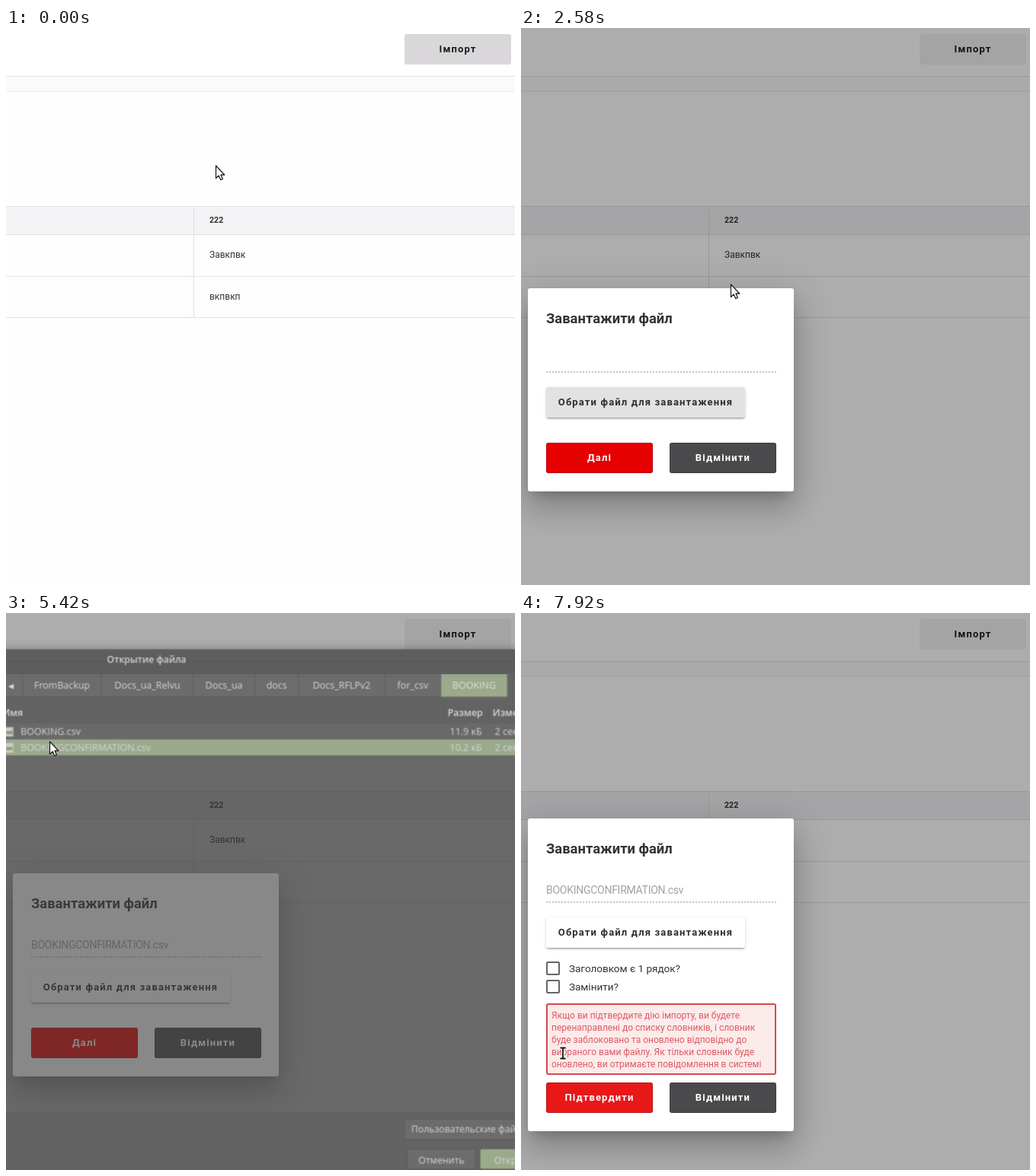
An HTML page for the animation above (8 s loop, 668x732 px).

```html
<!DOCTYPE html>
<html lang="uk">
<head>
<meta charset="utf-8">
<title>Імпорт</title>
<style>
html, body { margin: 0; width: 100%; height: 100%; overflow: hidden; }
body { position: relative; background: #fefefe; color: #333; font: 12px/20px Roboto, sans-serif; }
body * { box-sizing: border-box; }
div, span, svg { position: absolute; white-space: nowrap; }

/* 1% of the loop is 80 ms */
.smooth, .step { animation: 8s linear infinite; }
.step { animation-timing-function: step-end; }

/* page */
.top { left: 0; top: 0; width: 668px; height: 64px; background: #fff; border-bottom: 1px solid #e2e2e2; }
.strip { left: 0; top: 64px; width: 668px; height: 20px; background: #fafafa; border-bottom: 1px solid #ececec; }
.head { left: 0; top: 234px; width: 668px; height: 38px; background: #f3f3f5; border: solid #e1e1e2; border-width: 1px 0; }
.row { left: 0; width: 668px; height: 55px; border-bottom: 1px solid #e1e1e2; }
.col { left: 246px; top: 237px; width: 1px; height: 144px; background: #dfdfe1; }

/* buttons */
.btn {
  height: 40px; border-radius: 3px; overflow: hidden; color: #fff;
  font-size: 13px; font-weight: 700; line-height: 40px; letter-spacing: 1.15px; text-align: center;
}
.btn span { left: 0; width: 100%; }
.ripple { width: 68px; height: 68px; border-radius: 50%; opacity: 0; background: rgba(0, 0, 0, .11); }
#import { left: 523px; top: 8px; width: 140px; color: #1c1c1c; background: #d9d7da; animation-name: import; }
#import .ripple { left: 26px; top: -6px; animation-name: importRipple; }
@keyframes import {
  0% { background: #d9d7da; box-shadow: none; }
  19.7% { background: #d9d7da; box-shadow: 0 1px 3px rgba(0, 0, 0, .4); }
  28.1%, 100% { background: #f2f2f2; box-shadow: none; }
}
@keyframes importRipple {
  0% { opacity: 0; transform: scale(1); }
  23.9% { opacity: 1; transform: scale(1); }
  25% { opacity: 1; transform: scale(2); }
  26% { opacity: 1; transform: scale(3); }
  27.1% { opacity: .5; transform: scale(3.6); }
  28.1%, 100% { opacity: 0; transform: scale(3.6); }
}

/* import window */
#shade { inset: 0; background: rgba(0, 0, 0, .32); animation-name: shade; }
@keyframes shade { 0%, 26% { opacity: 0; } 30.2%, 100% { opacity: 1; } }
#pop { inset: 0; transform-origin: 184px 475px; animation-name: pop; }
@keyframes pop {
  0%, 26% { opacity: 0; transform: scale(.7); }
  28.1%, 100% { opacity: 1; transform: none; }
}
#modal {
  left: 9px; top: 342px; width: 349px; height: 267px; background: #fff; border-radius: 3px;
  box-shadow: 0 11px 15px -7px rgba(0, 0, 0, .2), 0 24px 38px 3px rgba(0, 0, 0, .14), 0 9px 46px 8px rgba(0, 0, 0, .12);
  animation-name: grow;
}
@keyframes grow {
  0% { top: 342px; height: 267px; }
  95.8%, 100% { top: 270px; height: 411px; }
}
.title { left: 24px; top: 30px; font-size: 18.4px; font-weight: 700; }
#name { left: 24px; top: 84px; font-size: 14px; letter-spacing: -.27px; color: #a2a2a2; animation-name: name; }
@keyframes name { 0% { opacity: 0; } 67.6%, 100% { opacity: 1; } }
.dots { left: 24px; top: 109px; width: 302px; border-top: 2px dotted #c4c4c4; }
#pick {
  left: 24px; top: 130px; width: 261px; color: #2f2f2f; background: #e2e2e2;
  box-shadow: 0 3px 1px -2px rgba(0, 0, 0, .2), 0 2px 2px rgba(0, 0, 0, .14), 0 1px 5px rgba(0, 0, 0, .12);
  animation-name: pick;
}
@keyframes pick {
  0% { background: #e2e2e2; }
  46.8% { background: #fff; }
  70% { background: #e2e2e2; }
  95.8%, 100% { background: #fff; }
}
#pick .ripple { left: 165px; top: -14px; animation-name: pickRipple; }
@keyframes pickRipple {
  0%, 41.6% { opacity: 0; transform: scale(0); }
  41.7% { opacity: 1; transform: scale(.5); }
  44.7% { opacity: 1; transform: scale(5); }
  46.8%, 100% { opacity: 0; transform: scale(6); }
}
#next, .cancel { bottom: 24px; width: 140px; box-shadow: inset 0 0 0 1px rgba(0, 0, 0, .18); }
#next { left: 24px; background: #e60000; animation-name: next; }
@keyframes next { 0% { background: #e60000; } 95.8%, 100% { background: #e81819; } }
#next .ripple { left: -16px; top: -4px; background: rgba(255, 255, 255, .2); animation-name: nextRipple; }
@keyframes nextRipple {
  0% { opacity: 0; transform: scale(1); }
  93.7% { opacity: 1; transform: scale(1); }
  94.7% { opacity: 1; transform: scale(2.2); }
  95.8%, 100% { opacity: 0; transform: scale(3); }
}
.cancel { left: 186px; background: #4a4a4c; }
.before { animation-name: before; }
.after { animation-name: after; }
@keyframes before { 0% { opacity: 1; } 95.8%, 100% { opacity: 0; } }
@keyframes after { 0% { opacity: 0; } 95.8%, 100% { opacity: 1; } }
.box { left: 24px; width: 18px; height: 18px; border: 2px solid #666; border-radius: 2px; }
.label { left: 54px; font-size: 13.5px; }
.warn {
  left: 24px; top: 243px; width: 302px; height: 94px; padding: 6px 5px; overflow: hidden;
  border: 2px solid #d6494f; border-radius: 3px; background: #fcebeb;
  color: #da5a64; font-size: 12px; line-height: 16px;
}

/* file chooser */
#files {
  inset: 0; transform-origin: 184.5px 392px; color: #f0f0f0;
  font: 13.1px/20px "Open Sans", "Noto Sans", sans-serif; animation-name: files;
}
@keyframes files {
  0%, 45.7% { opacity: 0; transform: scale(.876); }
  47.9% { opacity: 1; transform: none; animation-timing-function: step-end; }
  67.6% { opacity: .62; transform: scale(.953); animation-timing-function: step-end; }
  68.7% { opacity: .24; transform: scale(.91); animation-timing-function: step-end; }
  69.7%, 100% { opacity: 0; transform: scale(.876); }
}
.win { left: -416px; top: 31px; width: 1201px; height: 723px; background: #363636; border-radius: 5px 5px 0 0; box-shadow: 0 2px 16px rgba(0, 0, 0, .6); }
.bar { left: -416px; width: 1201px; }
.caption { top: 34px; left: 0; width: 369px; text-align: center; font-size: 12.8px; font-weight: 600; }
.tabs { left: 14px; top: 64px; display: flex; }
.tabs span { position: static; height: 33px; border: solid #2b2b2b; border-width: 1px 1px 1px 0; background: #444; line-height: 30px; text-align: center; }
.tabs span:last-child { background: #8fa876; color: #fff; }
.th { top: 108px; font-weight: 600; }
.sep { top: 105px; width: 1px; height: 28px; background: #2e2e2e; }
#sel { top: 133px; height: 22px; background: #8fa876; animation-name: sel; }
@keyframes sel { 0% { transform: none; } 59.4%, 100% { transform: translateY(22px); } }
.icon { left: -10px; width: 11px; height: 13px; border: 1px solid #eee; background: linear-gradient(#ddd 4px, #6d9a4d 4px 9px, #ddd 9px); }
.ctl { height: 29px; border: 1px solid #2a2a2a; border-radius: 3px; background: #444; line-height: 27px; text-align: center; }
#open { left: 643px; top: 719px; width: 95px; animation-name: open; }
@keyframes open { 0% { background: #444; } 59.4%, 100% { background: #8fa876; } }

/* pointer */
#pointer { left: 0; top: 0; animation-name: move; }
#pointer svg { left: -10px; top: -10px; }
@keyframes move {
  0% { transform: translate(275px, 181px); }
  18.7% { transform: translate(275px, 181px); animation-timing-function: steps(4, start); }
  22.8% { transform: translate(583px, 35px); }
  29% { transform: translate(583px, 35px); animation-timing-function: steps(4, start); }
  33.2% { transform: translate(275px, 337px); animation-timing-function: steps(3, start); }
  36.3% { transform: translate(232px, 490px); }
  48% { transform: translate(232px, 490px); animation-timing-function: steps(5, start); }
  53.2% { transform: translate(69px, 202px); }
  57% { transform: translate(69px, 202px); animation-timing-function: steps(2, start); }
  59.1% { transform: translate(57px, 169px); }
  69.7% { transform: translate(57px, 169px); animation-timing-function: steps(5, start); }
  74.9%, 100% { transform: translate(51px, 575px); }
}
#arrow { animation-name: arrow; }
#hand { animation-name: hand; }
@keyframes arrow {
  0% { opacity: 1; } 35.3% { opacity: 0; } 46.8% { opacity: 1; } 73.8%, 100% { opacity: 0; }
}
@keyframes hand {
  0% { opacity: 0; } 35.3% { opacity: 1; } 46.8% { opacity: 0; } 73.8% { opacity: 1; } 95.8%, 100% { opacity: 0; }
}
</style>
</head>
<body>
<div class="top"></div>
<div class="strip"></div>
<div id="import" class="btn step"><div class="ripple step"></div><span>Імпорт</span></div>
<div class="head"></div>
<div class="row" style="top:272px"></div>
<div class="row" style="top:326px"></div>
<div class="col"></div>
<span style="left:267px;top:243px;font-size:10.6px;font-weight:700">222</span>
<span style="left:267px;top:288px">Завкпвк</span>
<span style="left:267px;top:343px">вкпвкп</span>

<div id="shade" class="smooth"></div>
<div id="pop" class="smooth">
  <div id="modal" class="step">
    <span class="title">Завантажити файл</span>
    <span id="name" class="step">BOOKINGCONFIRMATION.csv</span>
    <div class="dots"></div>
    <div id="pick" class="btn step"><div class="ripple smooth"></div><span>Обрати файл для завантаження</span></div>
    <div class="after step">
      <div class="box" style="top:188px"></div><span class="label" style="top:187px">Заголовком є 1 рядок?</span>
      <div class="box" style="top:212px"></div><span class="label" style="top:211px">Замінити?</span>
      <div class="warn">Якщо ви підтвердите дію імпорту, ви будете<br>перенаправлені до списку словників, і словник<br>буде заблоковано та оновлено відповідно до<br>вибраного вами файлу. Як тільки словник буде<br>оновлено, ви отримаєте повідомлення в системі</div>
    </div>
    <div id="next" class="btn step">
      <div class="ripple step"></div>
      <span class="before step">Далі</span><span class="after step">Підтвердити</span>
    </div>
    <div class="btn cancel"><span>Відмінити</span></div>
  </div>
</div>

<div id="files" class="smooth">
  <div class="win"></div>
  <div class="bar" style="top:31px;height:33px;background:#2e2e2e;border-radius:5px 5px 0 0"></div>
  <span class="caption">Открытие файла</span>
  <div class="bar" style="top:64px;height:33px;width:430px;background:#444;border:1px solid #2b2b2b"></div>
  <span style="left:-6px;top:70px;font-size:15px">◂</span>
  <div class="tabs">
    <span style="width:109px">FromBackup</span><span style="width:126px">Docs_ua_Relvu</span><span style="width:85px">Docs_ua</span><span style="width:60px">docs</span><span style="width:119px">Docs_RFLPv2</span><span style="width:77px">for_csv</span><span style="width:92px">BOOKING</span>
  </div>
  <div class="bar" style="top:133px;height:538px;background:#3f3f3f;border-bottom:1px solid #2c2c2c"></div>
  <span class="th" style="left:-14px">Имя</span>
  <span class="th" style="left:599px">Размер</span>
  <span class="th" style="left:661px">Изменён</span>
  <div class="sep" style="left:594px"></div>
  <div class="sep" style="left:656px"></div>
  <div id="sel" class="bar step"></div>
  <div class="icon" style="top:138px"></div>
  <span style="left:11px;top:134px">BOOKING.csv</span>
  <span style="left:602px;top:134px">11.9 кБ</span>
  <span style="left:664px;top:134px">2 сек</span>
  <div class="icon" style="top:160px"></div>
  <span style="left:11px;top:156px">BOOKINGCONFIRMATION.csv</span>
  <span style="left:602px;top:156px">10.2 кБ</span>
  <span style="left:664px;top:156px">2 сек</span>
  <div class="ctl" style="left:539px;top:678px;width:199px;padding-left:9px;text-align:left;font-size:12.8px">Пользовательские файлы</div>
  <div class="ctl" style="left:543px;top:719px;width:95px;line-height:31px">Отменить</div>
  <div id="open" class="ctl step" style="line-height:31px">Открыть</div>
</div>

<div id="pointer" class="smooth">
  <svg id="arrow" class="step" width="40" height="40" viewBox="-10 -10 40 40">
    <path d="M.5 0V16.5L4.2 13L6.7 18.6L9.4 17.5L7 12H11.8Z" fill="#fff" stroke="#222" stroke-width="1.3" stroke-linejoin="round"/>
  </svg>
  <svg id="hand" class="step" width="40" height="40" viewBox="-10 -10 40 40">
    <path d="M0 9V1.5Q1.2-.3 2.6 1.5V6L10 7.3Q11.4 7.8 11.2 10L10.2 15.5H1L-3.5 10.5Q-3.6 8 0 9.8Z" fill="#fff" stroke="#111" stroke-width="1.2" stroke-linejoin="round"/>
    <path d="M3.2 9.5V12.5M5.7 9.5V12.5M8.2 9.5V12.5" stroke="#111"/>
  </svg>
  <svg class="after step" width="40" height="40" viewBox="-10 -10 40 40" fill="none">
    <path d="M.5-3.5H7.5M.5 10.5H7.5M4-3.5V10.5" stroke="#fff" stroke-width="4"/>
    <path d="M.5-3.5H7.5M.5 10.5H7.5M4-3.5V10.5" stroke="#111" stroke-width="1.8"/>
  </svg>
</div>
</body>
</html>
```
